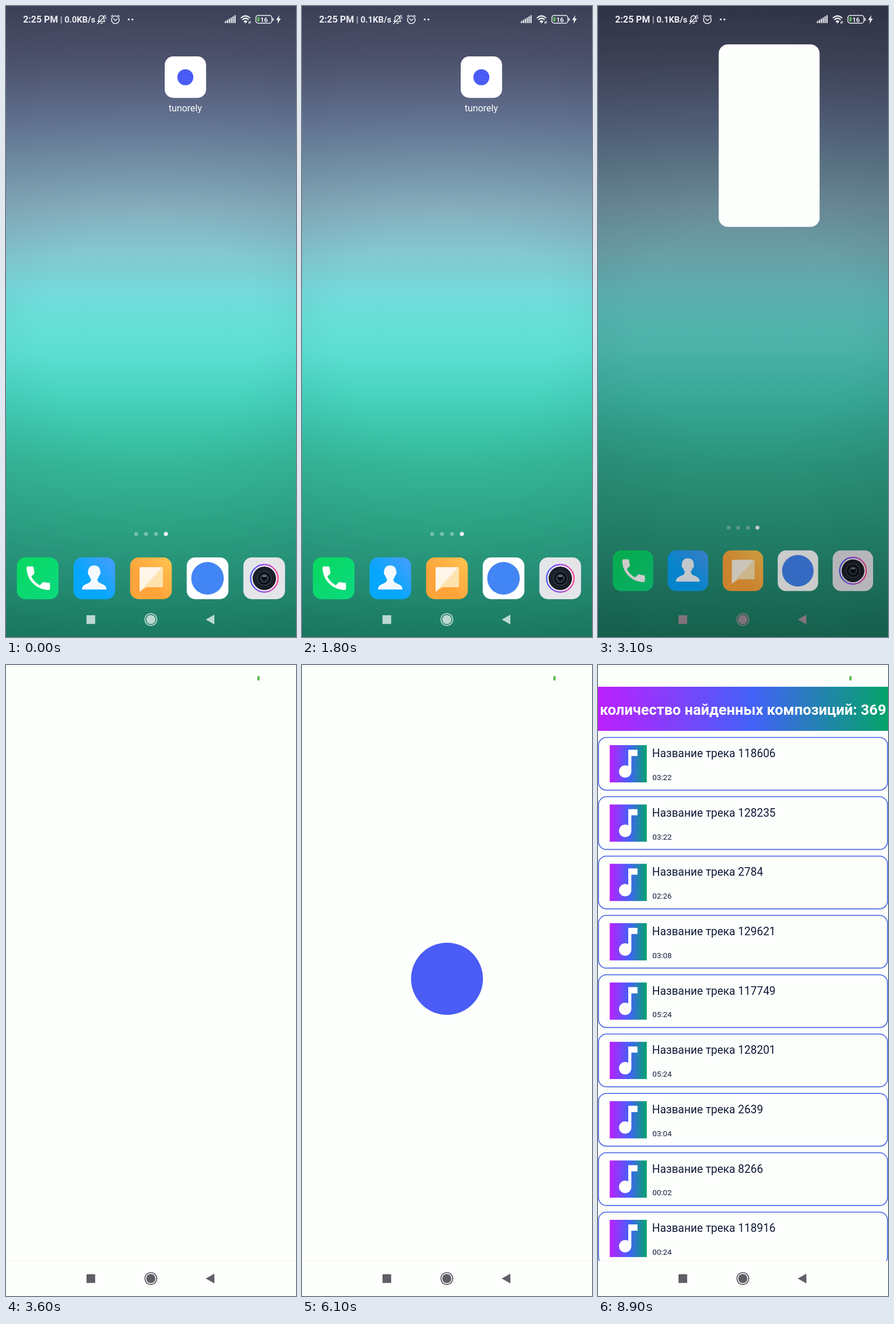
Animation, 508 px wide and 1102 px high, one loop 9 s. Source, as an HTML page:

```html
<!DOCTYPE html>
<html lang="ru">
<head>
<meta charset="utf-8">
<title>Player launch</title>
<style>
  html, body { margin: 0; width: 100%; height: 100%; overflow: hidden; background: #fdfffc; }
  svg { display: block; width: 508px; height: 1102px; font-family: Roboto, sans-serif; }
</style>
</head>
<body>
<svg viewBox="0 0 508 1102" xmlns="http://www.w3.org/2000/svg">
  <defs>
    <linearGradient id="sky" x2="0" y2="1"></linearGradient>
    <radialGradient id="vignette" gradientUnits="userSpaceOnUse" cx="254" cy="570" r="640">
      <stop offset=".3" stop-color="#142034" stop-opacity="0"/>
      <stop offset="1" stop-color="#142034" stop-opacity=".2"/>
    </radialGradient>
    <linearGradient id="brand">
      <stop stop-color="#bc20fe"/><stop offset=".53" stop-color="#4361f8"/><stop offset="1" stop-color="#05a46a"/>
    </linearGradient>
    <linearGradient id="green" x2="1" y2="1"><stop stop-color="#08d85f"/><stop offset="1" stop-color="#0cda80"/></linearGradient>
    <linearGradient id="blue" x1="1" x2="0" y2="1"><stop stop-color="#4a9dfa"/><stop offset=".6" stop-color="#07a6ff"/></linearGradient>
    <linearGradient id="orange" x1="1" x2="0" y2="1"><stop stop-color="#ffc552"/><stop offset=".6" stop-color="#ffa43a"/></linearGradient>
    <linearGradient id="ring" x2="1"><stop stop-color="#5060f0"/><stop offset=".5" stop-color="#a04cf0"/><stop offset="1" stop-color="#ff4b90"/></linearGradient>
    <clipPath id="listArea"><path d="M0 38H508V1041H0Z"/></clipPath>
  </defs>

  <rect width="508" height="1102" fill="url(#sky)"/>
  <rect width="508" height="1102" fill="url(#vignette)"/>

  <g id="home">
    <rect x="278" y="88" width="72.5" height="72.5" rx="15" fill="#fff"/>
    <circle cx="314.2" cy="124.5" r="14" fill="#4a5cf5"/>
    <text x="314" y="184" font-size="16.3" text-anchor="middle" fill="#fff">tunorely</text>
    <g id="dots" fill="#fff"></g>
    <g id="dock"></g>
    <path fill="#fff" transform="translate(29.2 972) scale(2.28)" d="M6.62 10.79c1.44 2.83 3.76 5.14 6.59 6.59l2.2-2.2c.27-.27.67-.36 1.02-.24 1.12.37 2.33.57 3.57.57.55 0 1 .45 1 1V20c0 .55-.45 1-1 1-9.39 0-17-7.61-17-17 0-.55.45-1 1-1h3.5c.55 0 1 .45 1 1 0 1.25.2 2.45.57 3.57.11.35.03.74-.25 1.02l-2.2 2.2z"/>
    <path fill="#f4faff" d="M154.500 977C161 977 165 981 165 987Q167 992 163 995Q162 999 160 1001Q160 1006 165 1008C172 1011 176 1013 176 1019H133C133 1013 137 1011 144 1008Q149 1006 149 1001Q147 999 146 995Q142 992 144 987C144 981 148 977 154.500 977Z"/>
    <path fill="#ffe3ae" d="M236 980H273Q275 980 275 982V1013Q275 1015 273 1015H246L234 1023V982Q234 980 236 980Z"/>
    <path fill="#fff6e8" d="M236 980H274L234 1023V982Q234 980 236 980Z"/>
    <circle cx="353" cy="999.500" r="28.500" fill="#4285f4"/>
    <g transform="translate(452.500 999.500)">
      <circle r="24" fill="#eeeef2" stroke="url(#ring)" stroke-width="2.400"/>
      <circle r="20.500" fill="#1b1f28"/>
      <circle r="12" fill="#0b0e14" stroke="#39414c" stroke-width="1.500"/>
      <circle r="7" fill="#1c2634" stroke="#56616e"/>
      <circle r="3.500" fill="#070a10"/>
      <ellipse cy="-4" rx="3.500" ry="1.500" fill="#76818e"/>
    </g>
  </g>

  <rect id="dim" width="508" height="1102"/>

  <g id="status" fill="#eef0f4" font-weight="700">
    <text x="30" y="29" font-size="16.200">2:25 PM</text>
    <text x="95" y="28.500" font-size="15" font-weight="400">|</text>
    <text id="speed" x="102.500" y="29" font-size="15"></text>
    <g fill="none" stroke="#eef0f4" stroke-width="1.500" stroke-linecap="round" stroke-linejoin="round">
      <path d="M161 27H173L171.500 24V20.500Q171 17 167.500 17Q163.500 17 163 20.500V24ZM166 30H169M160.500 31L174 16M174.500 19V22"/>
      <circle cx="191.500" cy="24" r="6.800"/>
      <path d="M188.500 22.500L191.500 25.500L195 22.500M184.500 18L187 16M198.500 18L196 16"/>
      <path d="M412 20.500Q419.500 14 427 20.500M414.500 23.500Q419.500 19.500 424.500 23.500" stroke-width="2.200"/>
      <rect x="437.700" y="16.500" width="28" height="13.500" rx="4"/>
    </g>
    <circle cx="215" cy="23.500" r="1.700"/><circle cx="221.500" cy="23.500" r="1.700"/>
    <path d="M416 26.500Q419.500 23.500 423 26.500L419.500 30.500ZM425 27H426.500V31H425ZM427.500 26H428.700V30H427.500Z"/>
    <path d="M467 21H468.700V26H467ZM479 16L473 24.500H476.700L475.500 31L481.500 22H478Z"/>
    <text x="445.500" y="27.500" font-size="11.500">16</text>
    <g id="bars"></g>
  </g>

  <rect id="window" fill="#fdfffc"/>

  <g id="app">
    <rect width="508" height="1102" fill="#fdfffc"/>
    <circle id="splash" cx="254" cy="548" r="63" fill="#4a5cf5"/>
    <g id="list" clip-path="url(#listArea)">
      <rect y="38" width="508" height="77" fill="url(#brand)"/>
      <text x="254" y="87" font-size="25.900" font-weight="700" text-anchor="middle" fill="#fff">количество найденных композиций: 369</text>
      <g id="tracks" fill="#101a38"></g>
    </g>
    <path d="M0 1041H508" stroke="#f0f2f0"/>
  </g>

  <rect x="440.200" y="19.500" width="4" height="7.500" rx="1" fill="#5cb85a"/>
  <g id="nav">
    <rect x="141" y="1064" width="15.200" height="15.200" rx=".5"/>
    <circle cx="253.700" cy="1071.500" r="8"/>
    <path d="M253.700 1060.200a11.300 11.300 0 1 0 .01 0ZM253.700 1062a9.500 9.500 0 1 1-.01 0Z" fill-rule="evenodd"/>
    <path d="M350 1071.500L365 1063V1080Z"/>
  </g>
</svg>

<script>
const $ = id => document.getElementById(id);
const fill = (id, items, draw) => { $(id).innerHTML = items.map(draw).join(''); };

fill('sky', [
  [0, '#45475f'], [100, '#565b75'], [200, '#69799a'], [280, '#7797ac'], [350, '#86aebe'],
  [430, '#84c7d0'], [500, '#74dadb'], [550, '#67e0d8'], [600, '#5ddfd3'], [680, '#47d3be'],
  [750, '#3bc4a8'], [800, '#36ba9a'], [900, '#2eac8a'], [1000, '#279b7c'], [1102, '#1a8968']
], ([y, color]) => `<stop offset="${y / 1102}" stop-color="${color}"/>`);

fill('dots', [0, 1, 2, 3], i =>
  `<circle cx="${228 + i * 17.35}" cy="922" r="3.5" opacity="${i < 3 ? .35 : 1}"/>`);

fill('dock', ['url(#green)', 'url(#blue)', 'url(#orange)', '#fff', '#e4e5e9'], (color, i) =>
  `<rect x="${19 + i * 99.2}" y="963" width="73" height="73" rx="15" fill="${color}"/>`);

fill('bars', [0, 1, 2, 3, 4, 5], i =>
  `<rect x="${383.5 + i * 3.3}" y="${26 - i * 2}" width="2.2" height="${4 + i * 2}" rx="1"/>`);

const note = 'M12 3v10.55c-.59-.34-1.27-.55-2-.55-2.21 0-4 1.79-4 4s1.79 4 4 4 4-1.79 4-4V7h4V3h-6z';
fill('tracks', [
  [118606, '03:22'], [128235, '03:22'], [2784, '02:26'], [129621, '03:08'], [117749, '05:24'],
  [128201, '05:24'], [2639, '03:04'], [8266, '00:02'], [118916, '00:24']
], ([number, length], i) => `
  <g transform="translate(0 ${126 + i * 103.62})">
    <rect x=".8" y="1.6" width="506.400" height="92" rx="14" fill="none" stroke="#dfe3ea" stroke-width="1.500"/>
    <rect x=".8" y=".5" width="506.400" height="92" rx="14" fill="#fdfffc" stroke="#4361e8" stroke-width="1.500"/>
    <rect x="20.500" y="14" width="65" height="65" fill="url(#brand)"/>
    <path d="${note}" transform="translate(20.500 14) scale(2.708)" fill="#fff"/>
    <text x="94.800" y="35.200" font-size="19.500">Название трека ${number}</text>
    <text x="95.300" y="75" font-size="13.600">${length}</text>
  </g>`);

const show = (id, on) => $(id).setAttribute('display', on ? 'inline' : 'none');
const set = (id, attrs) => { for (const k in attrs) $(id).setAttribute(k, attrs[k]); };
const mix = (a, b, p) => a + (b - a) * p;

const LOOP = 9000, STEP = 100;
const SPEED_AT = 1000, OPEN_AT = 2960, OPEN_FOR = 440, SPLASH_AT = 3900, LIST_AT = 6900;

function render(t) {
  const u = Math.min(1, Math.max(0, (t - OPEN_AT) / OPEN_FOR));
  const p = u * u * (3 - 2 * u);
  const opening = p > 0 && p < 1, open = p === 1;
  const scale = 1 - .123 * p;

  $('speed').textContent = t < SPEED_AT ? '0.0KB/s' : '0.1KB/s';
  set('home', { transform: `translate(254 551) scale(${scale}) translate(-254 -551)` });
  set('dim', { opacity: Math.min(.4, .85 * p) });
  set('window', {
    x: mix(278, 0, p), y: mix(88, 0, p),
    width: mix(72.5, 508, p), height: mix(72.5, 1102, p), rx: 16
  });
  set('nav', { fill: open ? '#5f6067' : opening ? '#83737a' : 'rgba(255,255,255,.7)' });
  show('window', opening);
  show('app', open);
  show('splash', t >= SPLASH_AT && t < LIST_AT);
  show('list', t >= LIST_AT);
}

function tick() {
  const t = performance.now() % LOOP;
  render(Math.floor(t / STEP) * STEP);
  requestAnimationFrame(tick);
}
tick();
</script>
</body>
</html>
```
